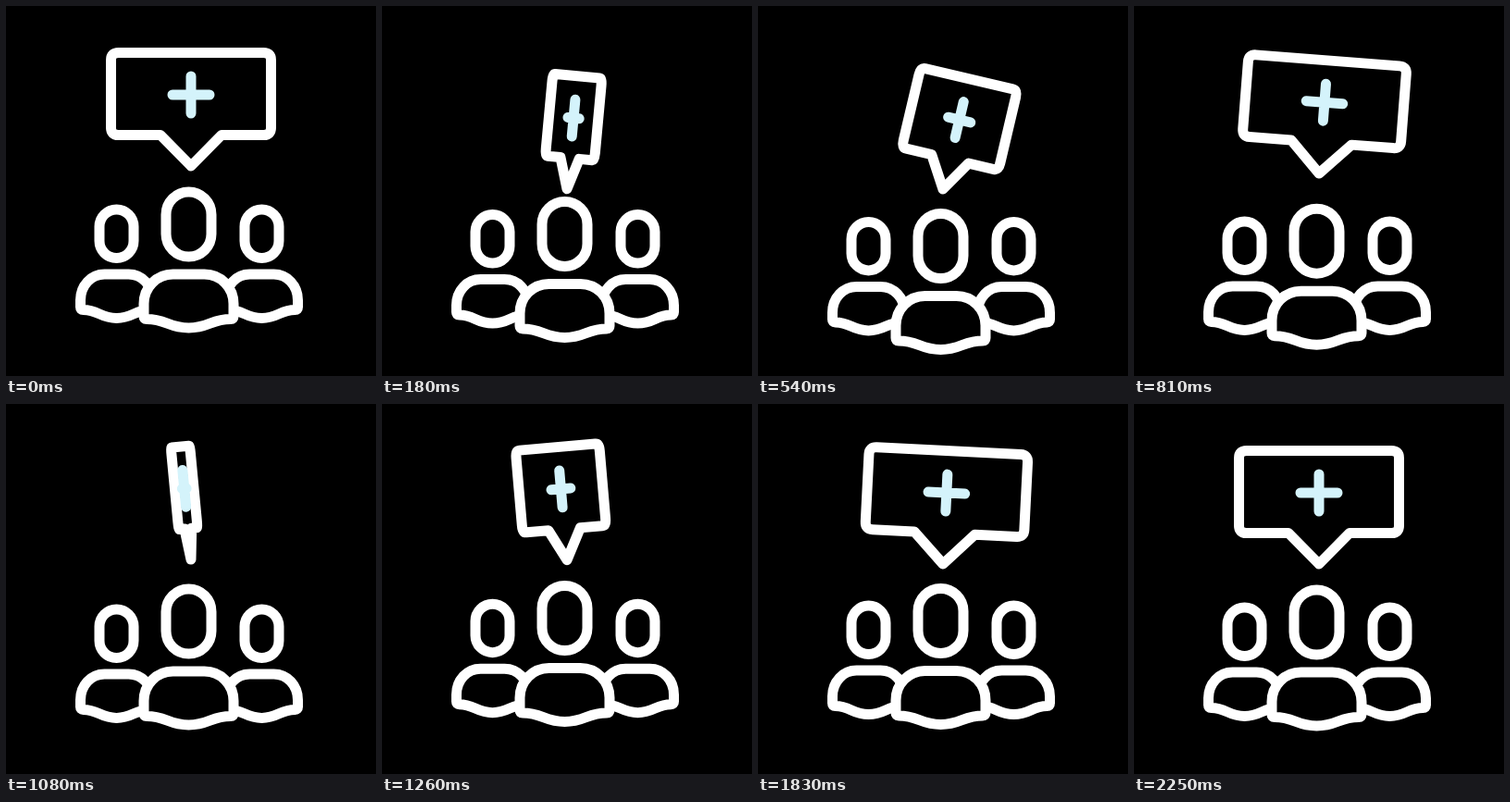
An HTML page with a canvas for the animation above (2.34 s loop, 400 px wide and 400 px high).

```html
<!DOCTYPE html>
<html lang="en">
<head>
<meta charset="utf-8">
<title>Group with speech bubble</title>
<style>
  html, body { margin: 0; width: 100%; height: 100%; overflow: hidden; background: #000; }
  canvas { display: block; width: 400px; height: 400px; }
</style>
</head>
<body>
<canvas id="stage" width="400" height="400"></canvas>
<script>
const ctx = document.getElementById('stage').getContext('2d');
const LOOP = 2340, STEP = 30, END = 2250;
const WHITE = '#fff', PALE = '#d4f3fb', BLACK = '#000';

const rad = deg => deg * Math.PI / 180;
const mix = (a, b, u) => a + (b - a) * u;
const sineOut = u => Math.sin(u * Math.PI / 2);
const sineInOut = u => (1 - Math.cos(u * Math.PI)) / 2;

// CSS-style cubic easing, solved by bisection.
function cubicBezier(x1, y1, x2, y2) {
  const at = (a, b, s) => 3 * (1 - s) ** 2 * s * a + 3 * (1 - s) * s * s * b + s ** 3;
  return u => {
    let lo = 0, hi = 1;
    for (let i = 0; i < 24; i++) {
      const mid = (lo + hi) / 2;
      if (at(x1, x2, mid) < u) lo = mid; else hi = mid;
    }
    return at(y1, y2, lo);
  };
}

// Starts at 0, swings through [ms, value] turning points and rests at 0.
function swing(rise, ...turns) {
  const points = [[0, 0], ...turns, [END, 0]];
  return t => {
    const i = Math.max(1, points.findIndex(p => p[0] >= t));
    const [t0, v0] = points[i - 1], [t1, v1] = points[i];
    const ease = i === 1 ? rise : sineInOut;
    return mix(v0, v1, ease((t - t0) / (t1 - t0)));
  };
}

const centreY = swing(sineOut, [635, 24.2], [1211, -4.5]);
const sideY = swing(sineOut, [700, 14.3], [1329, -4.4]);
const bubbleY = swing(sineOut, [260, 28], [398, 28], [1128, -5.3], [1600, 0]);
const tilt = swing(sineInOut, [415, 13.3], [525, 13.3], [1118, -5.6], [1890, 3]);
const spinEase = cubicBezier(0.42, 0.675, 0.38, 1);
const spin = t => 540 * spinEase(t / END);

function outline(color = WHITE) {
  ctx.strokeStyle = color;
  ctx.stroke();
}

function head(cx, top, width, height) {
  ctx.beginPath();
  ctx.roundRect(cx - width / 2, top, width, height, width / 2);
  outline();
}

// Shoulders with a wavy hem, mirrored around cx.
function body(cx, half, flat, shoulder, hem, dip) {
  const top = 290, round = 3;
  const bend = mix(shoulder, top, 0.56);
  const neck = mix(flat, half, 0.56);
  const l = cx - half, r = cx + half;
  ctx.beginPath();
  ctx.moveTo(l, hem - round);
  ctx.lineTo(l, shoulder);
  ctx.bezierCurveTo(l, bend, cx - neck, top, cx - flat, top);
  ctx.lineTo(cx + flat, top);
  ctx.bezierCurveTo(cx + neck, top, r, bend, r, shoulder);
  ctx.lineTo(r, hem - round);
  ctx.quadraticCurveTo(r, hem, r - round, hem);
  ctx.bezierCurveTo(cx + half * 0.5, hem, cx + half * 0.45, dip, cx, dip);
  ctx.bezierCurveTo(cx - half * 0.45, dip, cx - half * 0.5, hem, l + round, hem);
  ctx.quadraticCurveTo(l, hem, l, hem - round);
  ctx.closePath();
  ctx.fillStyle = BLACK;
  ctx.fill();
  outline();
}

function people(t) {
  ctx.save();
  ctx.translate(0, sideY(t));
  for (const cx of [119.5, 276.5]) {
    head(cx, 220, 37, 52.5);
    body(cx, 39, 13, 318, 328.5, 337.5);
  }
  ctx.restore();

  ctx.save();
  ctx.translate(0, centreY(t));
  head(197.5, 201, 49, 70);
  body(197.5, 48.5, 17, 322, 338.5, 348);
  ctx.restore();
}

// The bubble turns about its tip; the line weight stays constant.
function bubble(t) {
  const k = Math.abs(Math.cos(rad(spin(t))));
  const half = 86.5, top = -122.5, base = -33.5, round = 8, tail = 33;
  const to = (x, y) => ctx.lineTo(x * k, y);
  const corner = (x, y, x2, y2) => ctx.quadraticCurveTo(x * k, y, x2 * k, y2);

  ctx.save();
  ctx.translate(200, 173 + bubbleY(t));
  ctx.rotate(rad(tilt(t)));

  ctx.beginPath();
  ctx.moveTo(0, 0);
  to(-tail, base);
  to(-half + round, base);
  corner(-half, base, -half, base - round);
  to(-half, top + round);
  corner(-half, top, -half + round, top);
  to(half - round, top);
  corner(half, top, half, top + round);
  to(half, base - round);
  corner(half, base, half - round, base);
  to(tail, base);
  ctx.closePath();
  outline();

  ctx.beginPath();
  ctx.moveTo(-20 * k, -77);
  ctx.lineTo(20 * k, -77);
  ctx.moveTo(0, -97);
  ctx.lineTo(0, -57);
  outline(PALE);
  ctx.restore();
}

function draw(now) {
  const t = Math.min(END, Math.floor((now % LOOP) / STEP) * STEP);
  ctx.fillStyle = BLACK;
  ctx.fillRect(0, 0, 400, 400);
  ctx.lineWidth = 11;
  ctx.lineJoin = ctx.lineCap = 'round';
  people(t);
  bubble(t);
}

const start = performance.now();
function tick() {
  draw(performance.now() - start);
  requestAnimationFrame(tick);
}
tick();
</script>
</body>
</html>
```
